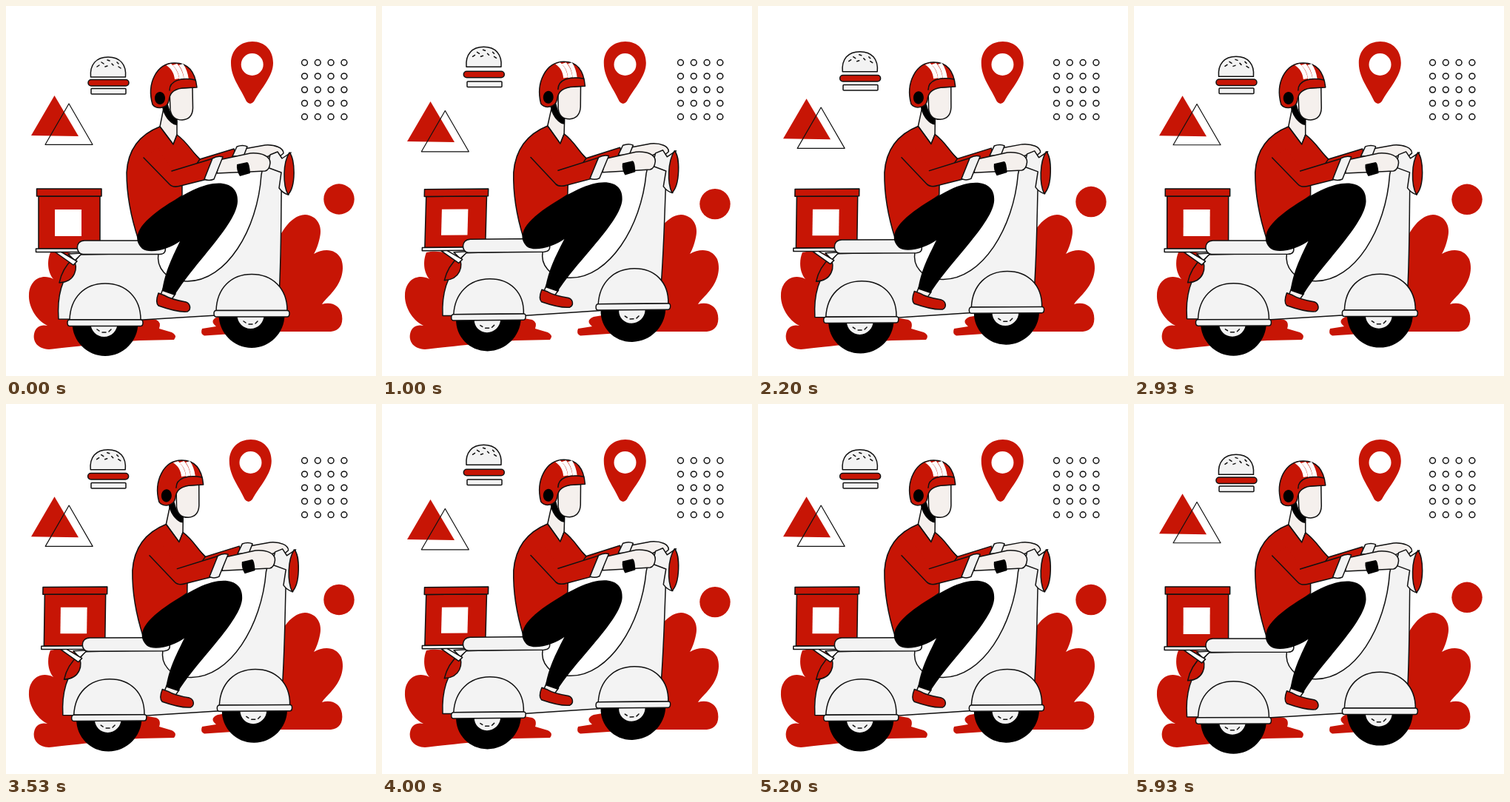
Animation of 500x500 px, one loop 5.99 s. Source, as an HTML page:

```html
<!DOCTYPE html>
<html lang="en">
<head>
<meta charset="utf-8">
<title>Scooter delivery</title>
<style>
  html, body { margin: 0; width: 100%; height: 100%; overflow: hidden; background: #fff; }
  svg { display: block; width: 100vw; height: 100vh; }
  .red { fill: #c71505; }
  .pale { fill: #f3f3f3; }
  .skin { fill: #f5f0ed; }
  .white { fill: #fff; }
  .black { fill: #000; }
  .none { fill: none; }
  .line { stroke: #111; stroke-width: 1.5; stroke-linejoin: round; stroke-linecap: round; }
</style>
</head>
<body>
<svg viewBox="0 0 500 500">
  <g class="red">
    <path d="M350,440 L360,335 C368,310 383,283 404,282 C421,283 428,298 424,313 C422,322 420,328 416,335 C430,327 446,328 453,342 C459,359 451,376 440,388 C434,395 430,398 427,403 C440,399 452,405 454,418 C456,431 450,439 439,440 L350,440 L268,445.500 Q262,443 265,436 L284,433 Q274,425 286,420 L310,416Z"/>
    <path d="M60,333 C72,330 90,332 100,340 L180,420 L203,424 Q210,427 207,436 L224,441 Q232,445 227,451 L180,452 C140,455 85,461 58,464 C42,463 36,453 38,443 C40,433 48,430 56,432 C40,424 30,405 31,390 C32,370 48,361 64,369 C55,358 56,342 60,333Z"/>
    <circle id="ball" cx="450" cy="261" r="20.7"/>
  </g>
  <g id="dots" class="white line"></g>
  <g id="pin">
    <path class="red" d="M304,77 C304,59 317,48 333,48 C350,48 361,60 361,77 C361,95 345,111 335,129 Q330,135 325,129 C317,111 304,97 304,77Z"/>
    <circle class="white" cx="332.7" cy="79" r="15"/>
  </g>
  <path id="solidTri" class="red" d="M65.5,121 L34,175 L98,176Z"/>
  <path id="lineTri" class="none line" style="stroke-width:1.2" d="M85,132 L53,187.3 L117,187.3Z"/>
  <g class="line">
    <g id="bun">
      <path class="pale" d="M114.500,96 C113,79 122,69 138,69 C154,69 163,79 161.500,96Z"/>
      <path class="none" d="M123,82 l3,-2 M129,76 l3,2 M137,73 l3,1 M134,82 l3,-1 M143,78 l2,2 M150,76 l2,2 M152,82 l3,2"/>
    </g>
    <rect id="patty" class="red" x="111" y="99.500" width="55" height="8.500" rx="4.200"/>
    <rect id="base" class="pale" x="115" y="111.500" width="47" height="7.500" rx="1"/>
  </g>
  <g id="rider"></g>
</svg>
<script>
const NS = 'http://www.w3.org/2000/svg';
const $ = id => document.getElementById(id);

function add(parent, tag, attrs) {
  const el = document.createElementNS(NS, tag);
  for (const key in attrs) el.setAttribute(key, attrs[key]);
  return parent.appendChild(el);
}

for (let row = 0; row < 5; row++)
  for (let col = 0; col < 4; col++)
    add($('dots'), 'circle', { cx: 403.5 + col * 17.8, cy: 76.5 + row * 18.3, r: 3.9 });

const box = (x, y, w, h) => `M${x},${y} L${x + w},${y} L${x + w},${y + h} L${x},${y + h}Z`;

function ellipse(x, y, rx, ry) {
  const a = rx * 0.5523, b = ry * 0.5523;
  return `M${x - rx},${y} C${x - rx},${y - b} ${x - a},${y - ry} ${x},${y - ry}` +
    ` C${x + a},${y - ry} ${x + rx},${y - b} ${x + rx},${y}` +
    ` C${x + rx},${y + b} ${x + a},${y + ry} ${x},${y + ry}` +
    ` C${x - a},${y + ry} ${x - rx},${y + b} ${x - rx},${y}Z`;
}

// Every path below is bent by the same displacement field; lift is extra vertical travel.
const parts = [];
const part = (cls, d, lift = 0) => parts.push({ el: add($('rider'), 'path', { class: cls }), d, lift });

function wheel(x, y) {
  part('black', ellipse(x, y, 44.5, 45));
  part('pale', ellipse(x - 1.5, y + 1, 18, 18));
  part('none line', `M${x - 11},${y + 9} L${x - 8},${y + 11} M${x - 4},${y + 13} L${x + 1},${y + 13} M${x + 5},${y + 12} L${x + 8},${y + 9}`);
}

function fender(x, y) {
  const lift = -2.5;
  part('pale line', `M${x - 48},${y} C${x - 47},${y - 30} ${x - 28},${y - 49} ${x},${y - 49} C${x + 28},${y - 49} ${x + 48},${y - 30} ${x + 48},${y}Z`, lift);
  part('pale line', `M${x - 48},${y} L${x + 48},${y} Q${x + 51},${y} ${x + 51},${y + 4} Q${x + 51},${y + 8.5} ${x + 48},${y + 8.5} L${x - 48},${y + 8.5} Q${x - 51},${y + 8.5} ${x - 51},${y + 4} Q${x - 51},${y} ${x - 48},${y}Z`, lift);
}

// far arm and hand
part('red line', 'M245,190 L262,207 L308,193 L314,210 L245,232Z');
part('skin line', 'M322,193 L350,188 C364,187 375,192 375,199 L368,205 L318,207Z');
part('pale line', 'M306,203 L312,190 Q320,187 326,190 L321,203Z');

// scooter
wheel(134, 428);
wheel(332, 417);
part('pale line', 'M71,423 C69,395 73,368 100,336 L206,334 C203,352 215,372 245,372 C298,372 340,302 345,228 L350,205 L366,198 L373,206 C371,270 373,340 368,408 L285,418 L185,424Z');
part('red line', 'M72,374 C75,359 82,349 91,341 C98,354 94,373 72,374Z');
part('white line', 'M84,335 L103,334 L93,344Z');
part('white line', 'M67,333 L74,332 L96,345 L91,350Z');
fender(134, 424);
fender(332, 411.5);
part('red line', box(44, 257, 83, 71));
part('red line', box(41.5, 247, 87.5, 10));
part('white', box(66, 275, 36, 36));
part('white line', box(40.5, 328, 88, 4.5));
part('pale line', 'M106,317 L190,317 L215,326 Q217,335 208,335.5 L104,335.5 C94,335 93,317 106,317Z');

// rider
part('skin line', 'M213,380 L229,389 L222,399 L208,393Z');
part('red line', 'M206,388 C203,396 203,402 206,405 C220,410 235,414 245,413 C251,410 249,402 243,400 C232,398 222,396 214,391Z');
part('skin line', 'M213,138 L208,163 L226,187 L231,174 L231,156Z');
part('black', 'M211,136 C213,150 224,161 231,161 L232,152 C222,148 221,140 219,133Z');
part('red line', 'M208,163 C185,172 165,190 163,225 C163,260 172,295 179,316 C190,295 215,272 238,256 L238,242 L262,207 C252,198 245,184 231,174 L226,187Z');
part('black', 'M178,309 C182,290 218,266 252,249 C290,231 314,240 313,264 C312,295 252,350 228,391 L211,385 C215,360 222,345 235,318 C222,328 195,336 184,328 C178,322 176,316 178,309Z');

// cowl and lamp
part('pale line', 'M353,218 L357,201 L367,197 L373,206 L385,198 C376,215 376,240 382,255 C376,254 372,250 369,246 L372,225Z');
part('red line', 'M383,198 C391,206 392,244 381,255 C374,241 374,212 383,198Z');

// near arm
part('skin line', 'M288,208 L330,199 C346,198 357,203 357,212 Q356,222 350,223 L330,224 L285,226Z');
part('black', 'M312,214 L326,211 Q329,212 330,226 L316,230 Q311,222 312,214Z');
part('red', 'M186,205 L205,192 L226,222 L280,206 L272,234 L236,243 Q226,246 221,241Z');
part('none line', 'M186,205 L221,241 Q226,246 236,243 L272,234 M224,223 L280,206');
part('pale line', 'M279,206 Q286,202 293,204 L281,234 Q274,237 268,234Z');

// head
part('skin line', 'M221,112 L222,140 Q224,154 238,154 Q252,153 252.5,138 L252,110Z');
part('red line', 'M198,133 C190,105 203,77 228,77 C248,77 256,92 258,110 L238,111 C224,113 221,120 220,128 C218,139 203,140 198,133Z');
for (const x of [0, 8.5, 17])
  part('white', `M${216.5 + x},80 L${223 + x * 0.95},78 C${230 + x * 0.8},84 ${233 + x * 0.75},91 ${234 + x * 0.75},98 L${228 + x * 0.75},99 C${227 + x * 0.75},91 ${224 + x * 0.8},85 ${216.5 + x},80Z`);
part('none line', 'M221,114 C221,101 236,96 256,100');
part('black', ellipse(208, 124.5, 7, 8.5));

function bend({ d, lift }, k) {
  return d.replace(/(-?[\d.]+),(-?[\d.]+)/g, (_, sx, sy) => {
    const x = +sx, y = +sy;
    const dx = 16 - 0.0145 * (x - 41) - 0.026 * (y - 247);
    const rise = y > 240 ? 1 - 0.029 * (y - 240) : (y - 77) / 163;
    const dy = rise - 0.009 * (x - 41) + lift;
    return (x + k * dx).toFixed(2) + ',' + (y + k * dy).toFixed(2);
  });
}

const sway = [[0, 0], [1000, 1], [1250, 1.1], [1500, 1], [3000, 0]];

function amount(t) {
  const i = sway.findIndex(key => t < key[0]);
  const [t0, a] = sway[i - 1], [t1, b] = sway[i];
  return a + (b - a) * (t - t0) / (t1 - t0);
}

// Pictures last 130 and 70 ms in turn.
const hold = t => Math.floor(t / 200) * 200 + (t % 200 >= 130 ? 130 : 0);
const shift = (id, x, y) => $(id).setAttribute('transform', `translate(${x} ${y})`);

let last = -1;
function draw(now) {
  const t = hold(now % 5990);
  if (t === last) return;
  last = t;
  const k = amount(t % 3000);
  for (const p of parts) p.el.setAttribute('d', bend(p, k));
  shift('ball', 0, 6.6 * k);
  shift('pin', -4.2 * k, 0);
  shift('solidTri', 0, 8 * k);
  shift('lineTri', 0.3 * k, 9.5 * k);
  shift('bun', -0.5 * k, -13.7 * k);
  shift('patty', -0.7 * k, -11.3 * k);
  shift('base', 0, -9.5 * k);
}

const start = performance.now();
function tick() {
  draw(performance.now() - start);
  requestAnimationFrame(tick);
}
tick();
</script>
</body>
</html>
```
